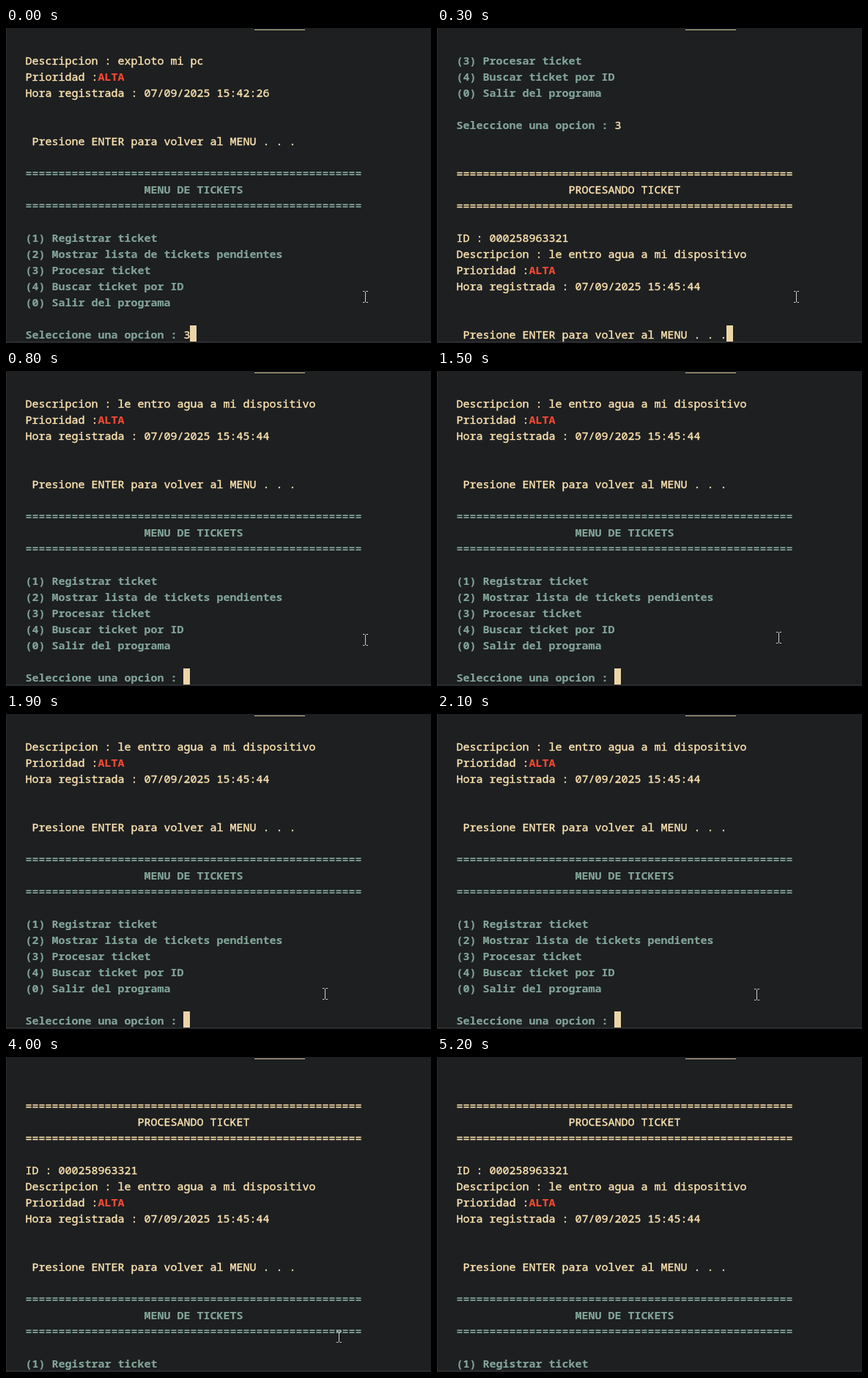
Write an HTML page that moves like this. It is 580x430 px and loops after 5300 ms.

```html
<!DOCTYPE html>
<html lang="es">
<head>
<meta charset="utf-8">
<title>Menu de tickets</title>
<style>
html, body { margin: 0; width: 100%; height: 100%; overflow: hidden; background: #1d1f21; }
#stage { position: relative; width: 580px; height: 430px; overflow: hidden; background: #1d1f21; }
#stage > * { position: absolute; margin: 0; }
#tab { left: 339px; top: 2px; width: 69px; height: 1px; background: #d8c9a0; }
#left { left: 0; top: 0; width: 1px; height: 430px; background: #2c2d2f; }
#bottom { left: 0; top: 428px; width: 580px; height: 1px; background: #333436; }
pre { font: 15px/22px "Noto Sans Mono", "DejaVu Sans Mono", monospace; font-variant-ligatures: none; }
#text { left: 26.5px; top: 33px; color: #fde3b0; -webkit-text-stroke: .4px; }
#text b { color: #83a598; -webkit-text-stroke: .15px; }
#text .high { color: #fb4934; }
#caret { width: 9px; height: 22px; background: #ebd5a8; color: #1d1f21; font-weight: bold; }
#mouse { left: 0; top: 0; }
</style>
</head>
<body>
<div id="stage">
  <div id="tab"></div>
  <div id="left"></div>
  <div id="bottom"></div>
  <pre id="caret"></pre>
  <pre id="text"></pre>
  <svg id="mouse" width="580" height="430">
    <path id="beam" d="M-3 -7.5h2.5M1.5 -7.5h2.5M.5 -7v14M-3 7.5h2.5M1.5 7.5h2.5" fill="none" stroke="#d0d0d0"/>
  </svg>
</div>
<script>
const LOOP = 5300, STEP = 100, ROWS = 18;
const $ = id => document.getElementById(id);
const bold = s => `<b>${s}</b>`;
const rule = "=".repeat(51);

const details = (text, hour) => [
  "Descripcion : " + text,
  'Prioridad :<b class="high">ALTA</b>',
  "Hora registrada : 07/09/2025 " + hour,
  "", "",
  " Presione ENTER para volver al MENU . . .",
  ""
];
const menu = [
  rule, " ".repeat(18) + "MENU DE TICKETS", rule, "",
  "(1) Registrar ticket",
  "(2) Mostrar lista de tickets pendientes",
  "(3) Procesar ticket",
  "(4) Buscar ticket por ID",
  "(0) Salir del programa",
  "", "Seleccione una opcion : "
].map(bold);

const lines = [
  ...details("exploto mi pc", "15:42:26"), ...menu,
  "", "",
  rule, " ".repeat(17) + "PROCESANDO TICKET", rule, "",
  "ID : 000258963321",
  ...details("le entro agua a mi dispositivo", "15:45:44"), ...menu
];
lines[17] += "3";

// time, first visible line, caret line, caret column, character under the caret
const views = [
  [0, 0, 17, 25, ""],
  [100, 1, 18, 0, ""],
  [200, 13, 30, 41, ""],
  [500, 22, 39, 0, "("],
  [600, 25, 42, 0, "S"],
  [700, 25, 42, 24, ""],
  [2200, 22, 42, 24, ""],
  [2400, 19, 42, 24, ""]
];

// time, x, y of the pointer
const path = [
  [0, 490, 367], [900, 490, 367], [1000, 487, 364], [1100, 487, 364],
  [1200, 463, 351], [1300, 463, 351], [1400, 474, 360], [1900, 435, 382],
  [2000, 435, 382], [2500, 439, 388], [3700, 439, 388], [4000, 454, 382],
  [4300, 489, 392]
];
const pointerEnd = 4400;

let shown;
function drawText(t) {
  const view = views.findLast(v => v[0] <= t);
  if (view === shown) return;
  shown = view;
  const [, top, line, col, char] = view;
  $("text").innerHTML = lines.slice(top, top + ROWS).join("\n");
  const caret = $("caret");
  caret.style.left = 26 + col * 9 + "px";
  caret.style.top = 32 + (line - top) * 22 + "px";
  // the covered character is painted dark above the block
  caret.style.zIndex = char ? 1 : 0;
  caret.textContent = char;
}

function drawPointer(t) {
  $("beam").style.visibility = t < pointerEnd ? "visible" : "hidden";
  const i = path.findLastIndex(p => p[0] <= t);
  const a = path[i], b = path[i + 1] || a;
  const k = a === b ? 0 : (t - a[0]) / (b[0] - a[0]);
  const at = n => Math.round(a[n] + (b[n] - a[n]) * k);
  $("beam").setAttribute("transform", `translate(${at(1)} ${at(2)})`);
}

function frame() {
  const t = Math.floor(performance.now() % LOOP / STEP) * STEP;
  drawText(t);
  drawPointer(t);
  requestAnimationFrame(frame);
}
frame();
</script>
</body>
</html>
```
